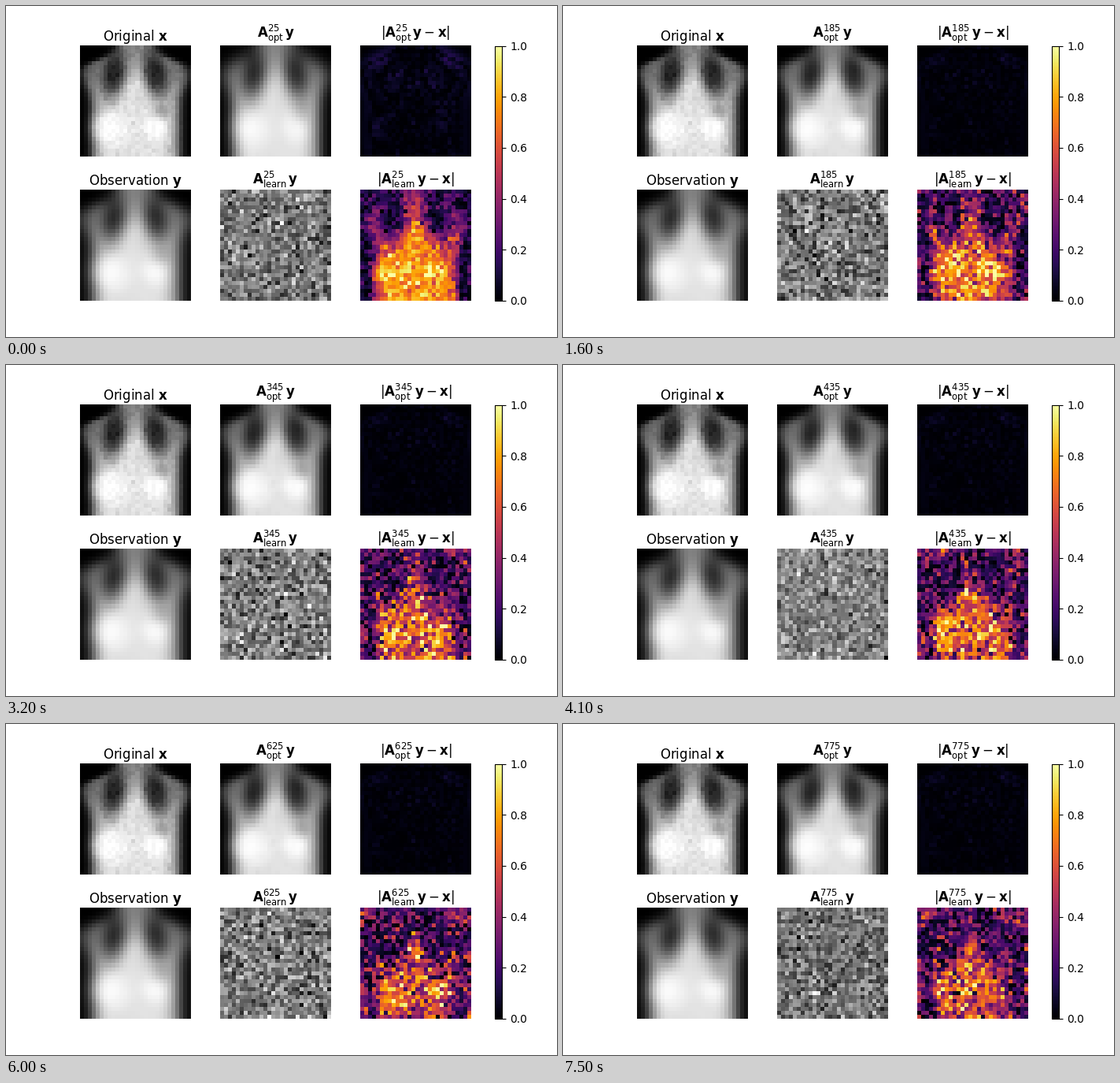
These frames come from a looping animation (700 by 420 pixels, 7600 ms). A matplotlib script:

```python
import matplotlib.pyplot as plt
import numpy as np
from matplotlib.animation import FuncAnimation

W, H, DPI = 700, 420, 100
FRAMES, STEP_MS = 76, 100
N = 28
SIDE = 140.6
LEFT, TOP = 94.2, 50.4
COL_GAP, ROW_GAP = 178, 182.8

r, c = np.mgrid[0:N, 0:N].astype(float)


def ramp(t):
    return 1 / (1 + np.exp(-t))


def blob(cx, cy, rx, ry):
    d = ((c - cx) / rx) ** 2 + ((r - cy) / ry) ** 2
    return np.exp(-d ** 1.5)


def blur(img, sv, sh):
    i = np.arange(N)

    def kernel(s):
        k = np.exp(-0.5 * ((i[:, None] - i) / s) ** 2)
        return k / k.sum(axis=1, keepdims=True)

    return kernel(sv) @ img @ kernel(sh).T


def chest():
    """Soft-gradient torso on a coarse grid."""
    mid = 13.6
    off = np.abs(c - mid)
    half = 4.5 + 9 * ramp((r - 3) / 0.9) - 2.6 * ramp((r - 10) / 1.5)
    body = ramp((half - off) / 0.7)
    spine = np.exp(-(off / 2.6) ** 2)
    img = 0.5 + 0.38 * ramp((r - 10 + 4.5 * spine) / 1.8)
    img *= body * (1 - 0.2 * ramp((off - 8.5) / 0.8))
    depth = 0.8 - 0.35 * ramp((r - 10.5) / 1.5)
    spread = 5.2 + 0.13 * (r - 6)
    for side in (-1, 1):
        img *= 1 - depth * blob(mid - 0.3 + side * spread, 7.5, 3, 6.6)
    img *= 1 - 0.25 * blob(20, 16.5, 2, 2)
    for cx, size in ((7.2, 4.3), (18.4, 3.2)):
        img += (1 - img) * blob(cx, 20.3, size, size)
    grain = np.random.default_rng(4).normal(0, 0.022, img.shape)
    return np.clip(img + grain * body, 0, 1)


x = chest()
y = blur(x, 1.25, 1.15)


def restored(n):
    rest = np.exp(-(n - 25) / 30)
    return blur(x, 0.75 + 1.05 * rest, 0.7 + 0.15 * rest)


def learned(n):
    mean = 0.40 - 0.28 * np.exp(-(n - 25) / 450)
    std = 0.205 - 0.10 * np.exp(-(n - 25) / 120)
    return np.random.default_rng(n).normal(mean, std, x.shape)


def op(name, n):
    return rf"\mathbf{{A}}_{{\mathrm{{{name}}}}}^{{{n}}}\,\mathbf{{y}}"


fig = plt.figure(figsize=(W / DPI, H / DPI), dpi=DPI, facecolor="white")


def add_axes(left, top, w, h):
    return fig.add_axes([left / W, 1 - (top + h) / H, w / W, h / H])


def title(ax, text):
    ax.set_title(text, fontsize=12, va="bottom", pad=0)


def panel(row, col, img, cmap="gray"):
    ax = add_axes(LEFT + col * COL_GAP, TOP + row * ROW_GAP, SIDE, SIDE)
    ax.axis("off")
    im = ax.imshow(img, cmap=cmap, vmin=0, vmax=1, interpolation="nearest")
    return ax, im


rows = []
for row, (label, still, name, solve) in enumerate((
        (r"Original $\mathbf{x}$", x, "opt", restored),
        (r"Observation $\mathbf{y}$", y, "learn", learned))):
    title(panel(row, 0, still)[0], label)
    rows.append((name, solve, panel(row, 1, x), panel(row, 2, x, "inferno")))

cax = add_axes(621, 50.6, 9.24, 323.2)
fig.colorbar(rows[0][3][1], cax=cax)


def update(i):
    n = 25 + 10 * i
    for name, solve, (ax, im), (err_ax, err) in rows:
        est = solve(n)
        im.set_data(est)
        if name == "learn":
            im.set_clim(est.min(), est.max())
        err.set_data(np.abs(est - x))
        title(ax, f"${op(name, n)}$")
        title(err_ax, rf"$|{op(name, n)} - \mathbf{{x}}|$")
    return []


anim = FuncAnimation(fig, update, frames=FRAMES, interval=STEP_MS,
                     repeat=True, repeat_delay=0, init_func=lambda: update(0))
plt.show()
```
